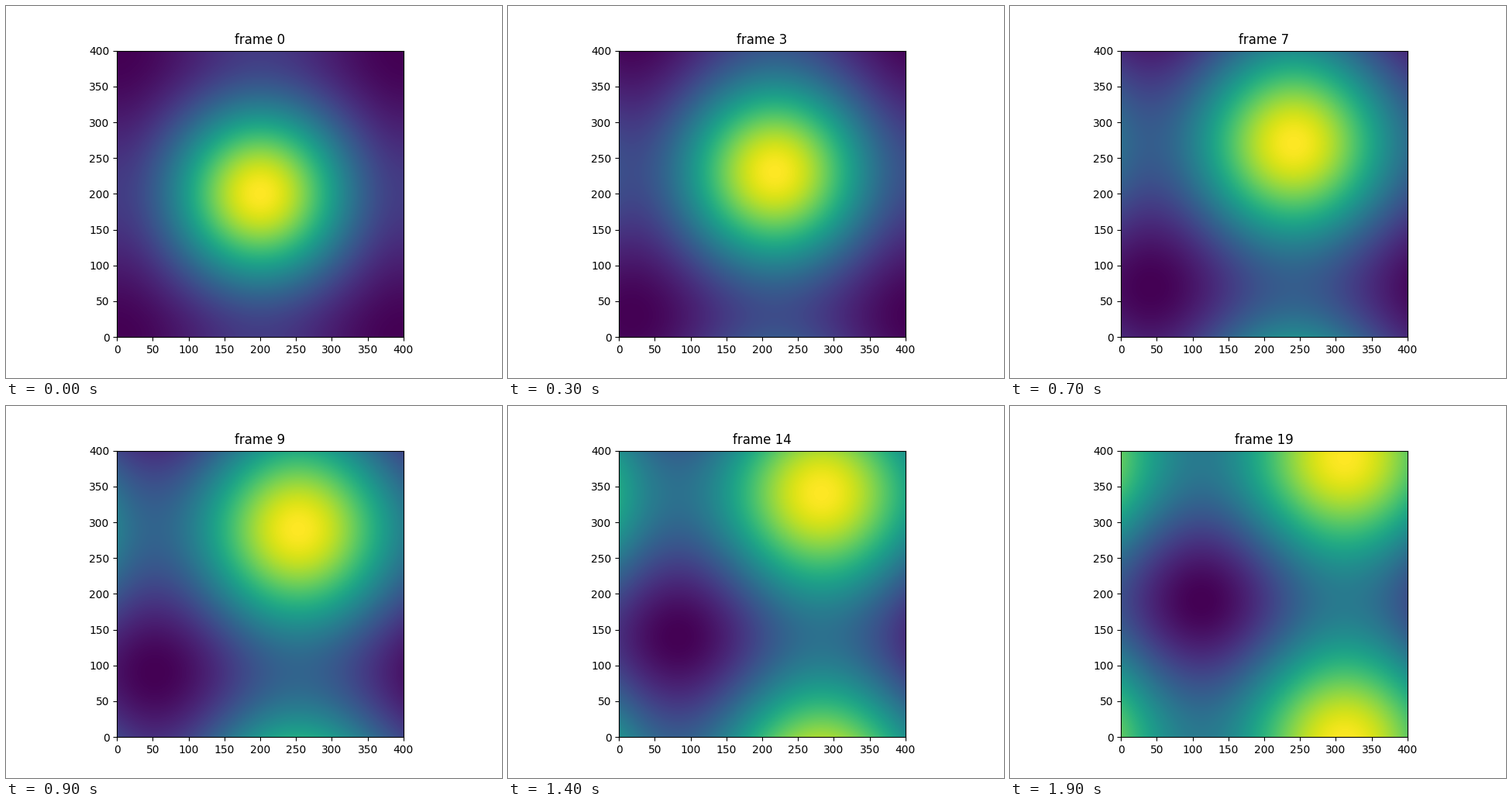
Recreate the animation shown at these times as a matplotlib script. Size 640 px wide and 480 px high, loop 2000 ms.

```python
import numpy as np
import matplotlib.pyplot as plt
from matplotlib.animation import FuncAnimation

SIZE = 400          # side of the periodic domain
FRAMES = 20
VELOCITY = (5.9, 10.0)
VAR_START = 9000.0  # variance of the blob at the beginning
VAR_STEP = 550.0    # variance gained per frame by diffusion

grid = np.arange(SIZE) + 0.5


def wrapped_gaussian(center, var):
    """Periodic Gaussian profile as a short Fourier series."""
    k = 2 * np.pi / SIZE
    profile = np.ones(SIZE)
    for n in range(1, 6):
        profile += 2 * np.exp(-var * (n * k) ** 2 / 2) * np.cos(n * k * (grid - center))
    return profile


def field(frame):
    var = VAR_START + VAR_STEP * frame
    gx, gy = (wrapped_gaussian(SIZE / 2 + v * frame, var) for v in VELOCITY)
    return np.outer(gy, gx)


fig, ax = plt.subplots(figsize=(6.4, 4.8), dpi=100)
image = ax.imshow(field(0), origin="lower", extent=(0, SIZE, 0, SIZE), cmap="viridis")
ticks = np.arange(0, SIZE + 1, 50)
ax.set_xticks(ticks)
ax.set_yticks(ticks)
title = ax.set_title("frame 0")


def update(frame):
    data = field(frame)
    image.set_data(data)
    image.set_clim(data.min(), data.max())
    title.set_text(f"frame {frame}")
    return image, title


anim = FuncAnimation(fig, update, frames=FRAMES, interval=100, repeat=True, repeat_delay=0)
plt.show()
```
